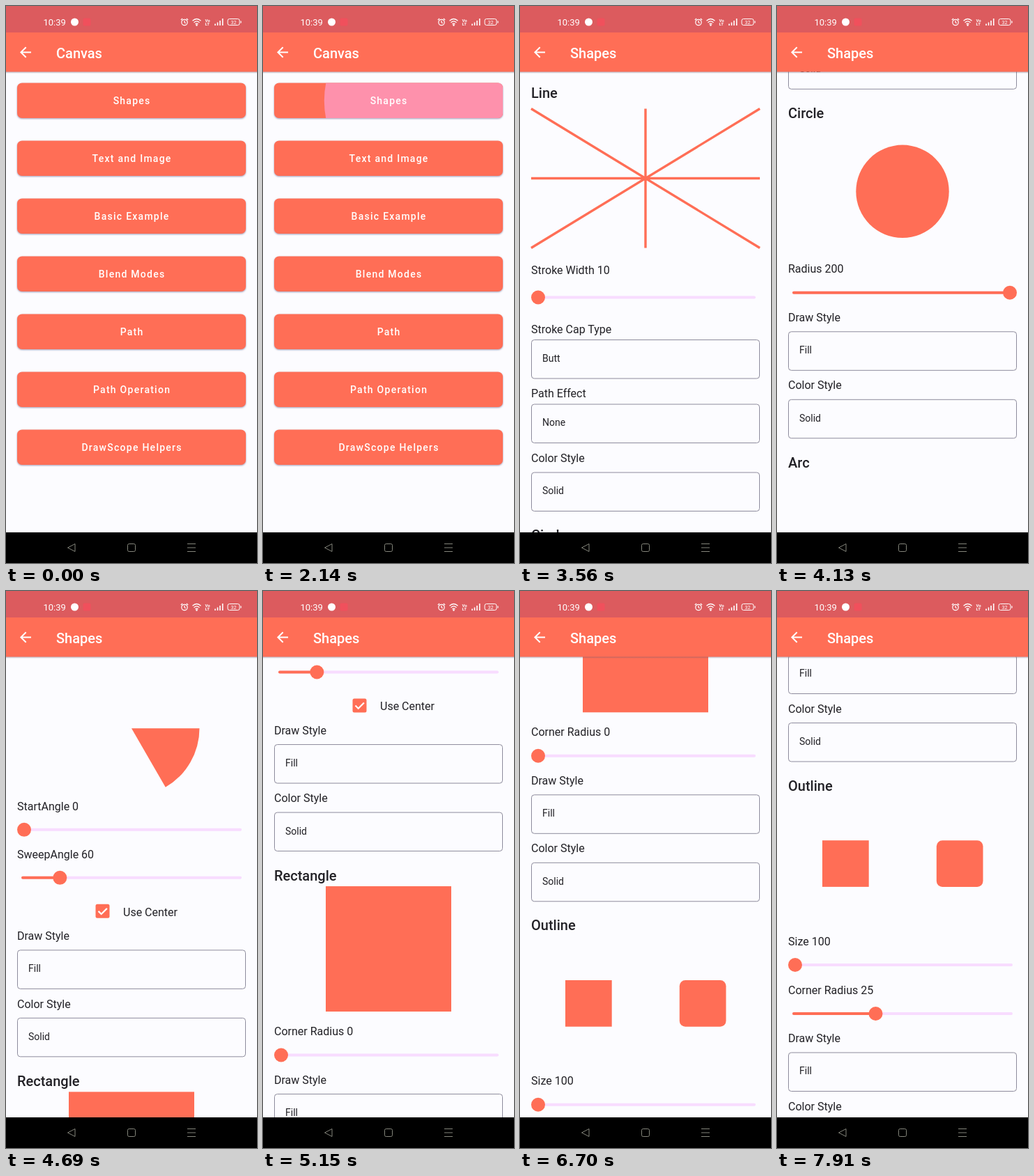
An HTML page that plays this animation: 360x800 px, repeating every 8000 ms.

```html
<!DOCTYPE html>
<html lang="en">
<head>
<meta charset="utf-8">
<title>Canvas shapes</title>
<style>
  html, body { margin: 0; width: 100%; height: 100%; overflow: hidden; background: #fcfcff; }
  svg { display: block; width: 360px; height: 800px; }
  text { font-family: Roboto, "Noto Sans", sans-serif; font-size: 16px; fill: #222126; }
  .title { font-size: 20px; font-weight: 500; }
  .field { font-size: 14px; }
  .bar { font-size: 20px; font-weight: 500; fill: #fff; }
  .btn { font-size: 14px; font-weight: 500; letter-spacing: 1.25px; fill: #fff; text-anchor: middle; }
  .raised { filter: drop-shadow(0 1px 1px rgba(70, 60, 110, .5)); }
</style>
</head>
<body>
<svg viewBox="0 0 360 800">
  <defs>
    <clipPath id="view"><rect y="94" width="360" height="662"/></clipPath>
    <clipPath id="first"><rect x="16" y="110.5" width="328" height="50.5" rx="7"/></clipPath>
    <linearGradient id="shade" x2="0" y2="1">
      <stop stop-color="#605870" stop-opacity=".5"/>
      <stop offset="1" stop-color="#605870" stop-opacity="0"/>
    </linearGradient>
  </defs>
  <rect width="360" height="800" fill="#fcfcff"/>
  <g clip-path="url(#view)">
    <g id="menu"></g>
    <g id="page"><g id="list"></g></g>
  </g>

  <rect y="94" width="360" height="3" fill="url(#shade)"/>
  <rect y="37" width="360" height="57.5" fill="#ff6e56"/>
  <rect width="360" height="38" fill="#dc5b5e"/>
  <path transform="translate(16 54.5)" fill="#fff" d="M20 11H7.83l5.59-5.59L12 4l-8 8 8 8 1.41-1.41L7.83 13H20z"/>
  <text id="from" class="bar" x="72" y="74.5">Canvas</text>
  <text id="to" class="bar" x="72" y="74.5">Shapes</text>

  <g id="status" fill="none" stroke="#fff" stroke-width="1.2">
    <text x="53.5" y="27.5" stroke="none" style="font-size:13px;fill:#fff">10:39</text>
    <circle cx="98.5" cy="23" r="5.5" fill="#fff" stroke="none"/>
    <rect x="110.5" y="17.500" width="11" height="11" rx="2" fill="#f0505c" stroke="none"/>
    <circle cx="256" cy="23.500" r="4.200"/>
    <path d="M256 21v2.700l1.800 1M250.800 20l2.400-2M261.200 20l-2.400-2"/>
    <path d="M267.500 21.200q6-5.400 12 0M269.500 23.700q4-3.600 8 0M271.500 26q2-1.800 4 0"/>
    <circle cx="273.500" cy="27.500" r=".7" fill="#fff"/>
    <text x="285.500" y="22.500" stroke="none" style="font-size:6px;font-weight:700;fill:#fff">Vo</text>
    <text x="285.500" y="28.200" stroke="none" style="font-size:6px;font-weight:700;fill:#fff">LT</text>
    <path stroke-width="1.600" d="M300 28v-2.500M303.500 28v-4.500M307 28v-7M310.700 28v-10"/>
    <rect x="318" y="18.500" width="17" height="9" rx="2.500" stroke-width="1"/>
    <path d="M337 21.500v3"/>
    <text x="322.500" y="25.700" stroke="none" style="font-size:7px;fill:#fff">32</text>
  </g>

  <rect y="756" width="360" height="44" fill="#000"/>
  <g fill="none" stroke="#85867c">
    <path d="M88.500 778l10.500-5.500v11z" stroke-linejoin="round"/>
    <rect x="174.500" y="772.500" width="11" height="11" rx="2"/>
    <path d="M260 772.500h12M260 778h12M260 783.500h12"/>
  </g>
</svg>
<script>
const CORAL = '#ff6e56', LOOP = 8000;
const $ = id => document.getElementById(id);

// Each helper takes the vertical centre of the part.
const text = (cls, x, y, s, size) => `<text class="${cls}" x="${x}" y="${y + size * .355}">${s}</text>`;
const title = (y, s) => text('title', 16, y, s, 20);
const label = (y, s, x = 16) => text('', x, y, s, 16);
const box = (x, y, w, h, rx = 0) => `<rect x="${x}" y="${y}" width="${w}" height="${h}" rx="${rx}" fill="${CORAL}"/>`;

function slider(y, part) {
  const x = 26 + 308 * part;
  const track = (end, color) => `<path d="M24 ${y}H${end}" stroke="${color}" stroke-width="4" stroke-linecap="round"/>`;
  return track(336, '#f8dcff') + (part ? track(x, CORAL) : '') + `<circle cx="${x}" cy="${y}" r="10" fill="${CORAL}"/>`;
}
function field(y, name, value, gap = 20.5) {
  const top = y + gap;
  return label(y, name) +
    `<rect x="16.5" y="${top}" width="327" height="55.5" rx="4" fill="none" stroke="#8d8b9c"/>` +
    text('field', 32, top + 26.5, value, 14);
}
const styles = y => field(y, 'Draw Style', 'Fill') + field(y + 97.5, 'Color Style', 'Solid');
const control = (y, name, part) => label(y, name) + slider(y + 34, part);

function pie(cx, cy, r, deg) {
  const a = deg * Math.PI / 180;
  return `<path fill="${CORAL}" d="M${cx} ${cy}h${r}A${r} ${r} 0 0 1 ${cx + r * Math.cos(a)} ${cy + r * Math.sin(a)}z"/>`;
}

const names = ['Shapes', 'Text and Image', 'Basic Example', 'Blend Modes', 'Path', 'Path Operation', 'DrawScope Helpers'];
$('menu').innerHTML =
  '<g class="raised">' + names.map((_, i) => box(16, 110.5 + 83 * i, 328, 50.5, 7)).join('') + '</g>' +
  '<g clip-path="url(#first)"><circle id="ripple" cy="136" fill="#fe91ac"/></g>' +
  names.map((s, i) => text('btn', 180.6, 136.5 + 83 * i, s, 14)).join('');

const check = `<rect x="128.500" y="1627" width="20" height="20" rx="2.5" fill="${CORAL}"/>
  <path d="M132.500 1637l4.200 4.200 8.200-8.200" fill="none" stroke="#fff" stroke-width="2.200"/>`;

$('list').innerHTML = [
  title(125, 'Line'),
  `<path d="M16 247.5H344M180 147.500V347.500M16 147.500L344 347.500M16 347.500L344 147.500" stroke="${CORAL}" stroke-width="3.400"/>`,
  label(379, 'Stroke Width 10'), slider(418.5, 0),
  field(464, 'Stroke Cap Type', 'Butt', 15.5),
  field(556.5, 'Path Effect', 'None', 15.5),
  field(649.5, 'Color Style', 'Solid'),

  title(760, 'Circle'),
  `<circle cx="180" cy="872.5" r="66.7" fill="${CORAL}"/>`,
  control(984, 'Radius 200', 1), styles(1053.5),

  title(1262, 'Arc'), pie(180, 1374.5, 97.5, 60),
  control(1486, 'StartAngle 0', 0), control(1555, 'SweepAngle 60', 1 / 6),
  check, label(1638, 'Use Center', 168), styles(1672.5),

  title(1881, 'Rectangle'), box(90, 1896.5, 180, 180),
  control(2105, 'Corner Radius 0', 0), styles(2174.5),

  title(2382.5, 'Outline'),
  box(65, 2461.2, 66.7, 66.7), box(228.8, 2461.2, 66.7, 66.7, 8.3),
  control(2606, 'Size 100', 0), control(2676, 'Corner Radius 25', .375), styles(2745.5)
].join('');

const clamp = x => Math.min(1, Math.max(0, x));

// Curve (.4, 0) (.2, 1), solved by bisection.
function ease(x) {
  if (x <= 0 || x >= 1) return clamp(x);
  let lo = 0, hi = 1;
  for (let i = 0; i < 24; i++) {
    const u = (lo + hi) / 2, v = 1 - u;
    if (1.2 * v * v * u + .6 * v * u * u + u ** 3 < x) lo = u; else hi = u;
  }
  return 3 * (1 - lo) * lo * lo + lo ** 3;
}

// time, scroll offset, speed
const keys = [[3570, 0, .35], [4130, 605, 1.2], [5150, 1472, .45], [6700, 1902, .2], [7910, 2103, .12]];
function scrollAt(t) {
  if (t <= keys[0][0]) return 0;
  for (let i = 1; i < keys.length; i++) {
    const [t0, a, va] = keys[i - 1], [t1, b, vb] = keys[i];
    if (t > t1) continue;
    const d = t1 - t0, u = (t - t0) / d, v = 1 - u;
    return a * v * v * (1 + 2 * u) + b * u * u * (3 - 2 * u) + d * u * v * (va * v - vb * u);
  }
  return keys[keys.length - 1][1];
}

// The picture rests during these spans.
const rests = [[2140, 2240], [2700, 2800], [3240, 3560], [4310, 4410], [5200, 5300],
  [6040, 6140], [6880, 6980], [7770, 7870], [7910, 8000]];

function draw(time) {
  const rest = rests.find(([a, b]) => time >= a && time < b);
  const t = rest ? rest[0] : time;

  const u = clamp((t - 2070) / 225);
  $('ripple').setAttribute('cx', 180 + 54 * (1 - u));
  $('ripple').setAttribute('r', 98 + 79 * ease(u));
  $('ripple').setAttribute('opacity', clamp((t - 2070) / 70));

  const p = ease((t - 2240) / 700);
  for (const id of ['menu', 'from']) $(id).setAttribute('opacity', 1 - p);
  for (const id of ['page', 'to']) $(id).setAttribute('opacity', p);
  $('list').setAttribute('transform', `translate(0 ${-scrollAt(t)})`);
}

const start = performance.now();
function tick() {
  draw((performance.now() - start) % LOOP);
  requestAnimationFrame(tick);
}
tick();
</script>
</body>
</html>
```
